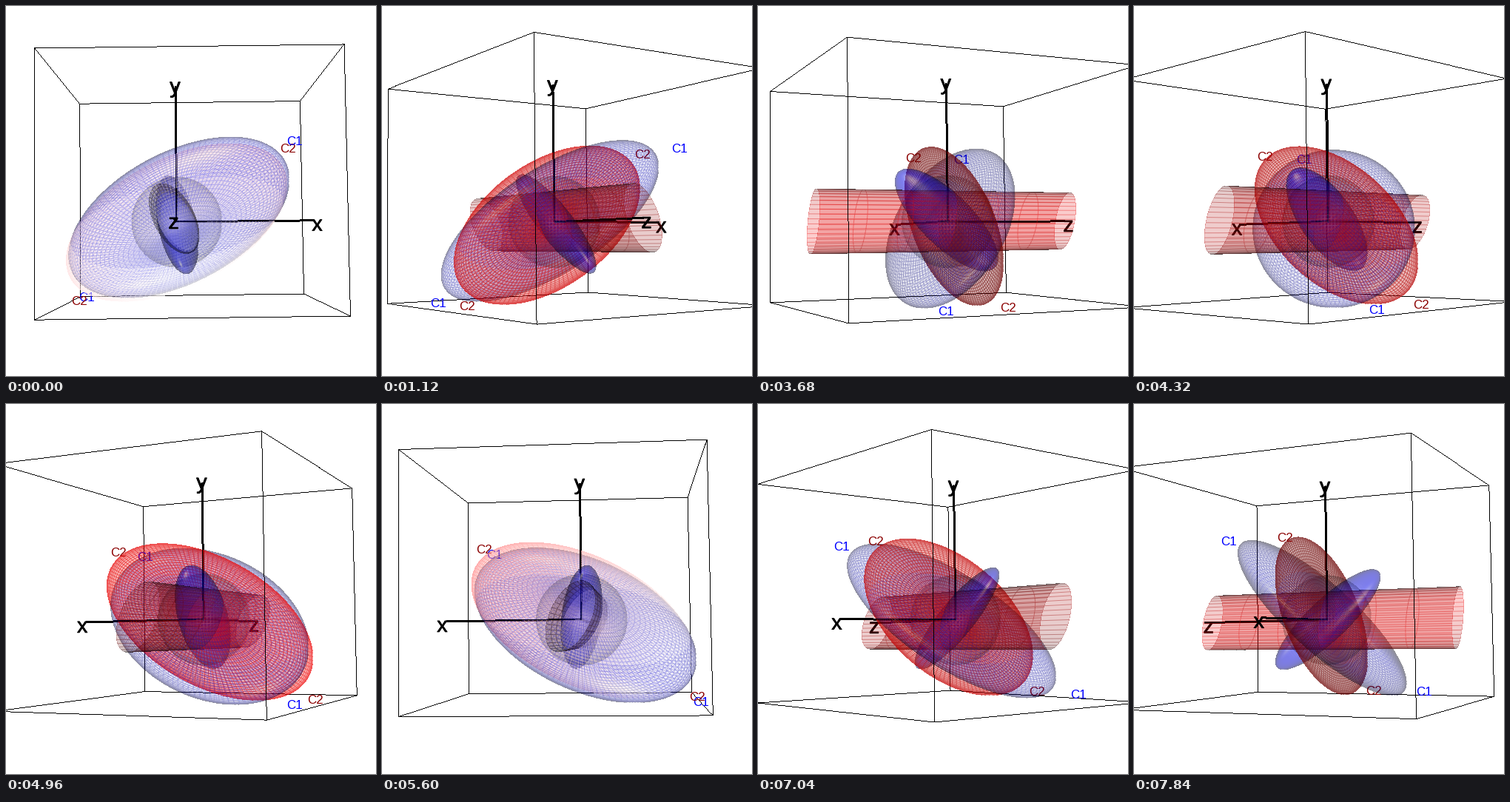
These frames come from a looping animation (500 by 500 pixels, 8000 ms). A matplotlib script:

```python
import itertools

import matplotlib.pyplot as plt
import numpy as np
from matplotlib.animation import FuncAnimation
from matplotlib.patheffects import withStroke

SIZE, DPI = 500, 100
PX = 72 / DPI                          # points per pixel
FRAMES, INTERVAL = 50, 160
STEP = np.radians(5)                   # turn per frame
PITCH, ROLL = 0.059, 0.012
SCALE, DIST = 61.3, 18.44              # pixels per unit, eye distance
CENTER = np.array([0.318, 0.68, 0.04])
HALF = np.array([2.861, 2.49, 3.15])   # half sides of the box
X0, X1, Y0, Y1 = 40, 470, 100, 420     # traced part of the stage
CYL = 3.0

RED, BLUE, GRAY = (1, 0, 0), (0, 0, 1), (0.35, 0.35, 0.35)


def axes_of(cov):
    """Half axes (long to short) and directions of a covariance ellipsoid."""
    val, vec = np.linalg.eigh(np.array(cov, float))
    return np.sqrt(val[::-1]), vec[:, ::-1]


full_s, full_u = axes_of([[6, 2, 1], [2, 3, 2], [1, 2, 2]])
flat_s, flat_u = axes_of([[6, 2], [2, 3]])

# Each matrix maps its surface to the unit sphere.
TO_C1 = np.diag(1 / full_s) @ full_u.T
TO_INV1 = np.diag(full_s) @ full_u.T
TO_BALL = np.roll(np.eye(3), 1, axis=0)
TO_CYL = np.zeros((3, 3))
TO_CYL[:2, :2] = np.diag(flat_s) @ flat_u.T
TO_DISK = np.diag(1 / flat_s) @ flat_u.T

# matrix, colour, fill alpha, wire alpha, meridians, parallels (0 = open tube)
SOLIDS = [
    (TO_C1, BLUE, 0.02, 0.23, 120, 60),
    (TO_INV1, BLUE, 0.03, 0.27, 120, 60),
    (TO_BALL, GRAY, 0.0, 0.15, 90, 45),
    (TO_CYL, RED, 0.20, 0.30, 40, 0),
]
DISK_FILL, DISK_WIRE = 0.26, 0.44

AXES = np.eye(3) * 3.0
LABELS = [("x", (3.1, 0, 0)), ("y", (0, 3.1, 0)), ("z", (0, 0, 3.1))]
TAGS = [("C1", (2.32, 1.66, 1.30), "#0000ff"),
        ("C2", (2.32, 1.65, 0.0), "#8b0000")]

cols, rows = np.meshgrid(np.arange(X0, X1) + 0.5, np.arange(Y0, Y1) + 0.5)
RAYS = np.stack([(cols - SIZE / 2) / SCALE, (SIZE / 2 - rows) / SCALE,
                 np.full(cols.shape, -DIST)])
VIEW = -RAYS / np.linalg.norm(RAYS, axis=0)
MID = VIEW + np.array([0, 0, 1.0])[:, None, None]
MID /= np.linalg.norm(MID, axis=0)


def rotation(theta):
    c, s = np.cos(theta), np.sin(theta)
    yaw = np.array([[c, 0, s], [0, 1, 0], [-s, 0, c]])
    c, s = np.cos(PITCH), np.sin(PITCH)
    pitch = np.array([[1, 0, 0], [0, c, s], [0, -s, c]])
    c, s = np.cos(ROLL), np.sin(ROLL)
    roll = np.array([[c, -s, 0], [s, c, 0], [0, 0, 1]])
    return roll @ pitch @ yaw


def project(rot, point):
    x, y, z = rot @ (np.asarray(point, float) - CENTER)
    k = SCALE / (1 - z / DIST)
    return SIZE / 2 + k * x, SIZE / 2 - k * y, z


def apply(mat, field):
    return np.tensordot(mat, field, axes=1)


def wires(phase, period=1e9):
    """Coverage of one-pixel lines at whole values of phase."""
    slope = 0
    for ax in (0, 1):
        last = np.take(phase, [-1], axis=ax)
        d = np.diff(phase, axis=ax, append=last)
        slope = slope + (d - period * np.round(d / period)) ** 2
    slope = np.sqrt(np.nan_to_num(slope, nan=1.0)) + 1e-6
    line = np.clip(1 - np.abs(phase - np.round(phase)) / slope, 0, 1)
    return np.where(slope > 0.6, np.minimum(slope, 1), line)


def lit(normal, color, view, mid):
    """Headlight shading with a white highlight, both sides lit."""
    normal = normal / np.linalg.norm(normal, axis=0)
    normal = normal * np.sign((normal * view).sum(0))
    diffuse = np.clip(normal[2], 0, 1)
    shine = np.clip((normal * mid).sum(0), 0, 1) ** 50
    rgb = [np.clip(c * diffuse + shine, 0, 1) for c in color]
    return np.stack(rgb)


def layer(box, t, rgb, alpha):
    depth = np.full(cols.shape, np.inf)
    rgba = np.zeros((4,) + cols.shape)
    ok = np.isfinite(t) & np.isfinite(alpha)
    depth[box] = np.where(ok, t, np.inf)
    rgba[(slice(3, 4),) + box] = np.where(ok, alpha, 0)
    rgba[(slice(0, 3),) + box] = np.where(ok, rgb, 0)
    return depth, rgba


def bounds(mask):
    r, c = np.where(mask.any(1))[0], np.where(mask.any(0))[0]
    return slice(r[0], r[-1] + 1), slice(c[0], c[-1] + 1)


def solid_layers(rot, eye, ray, solid):
    mat, color, fill, wire, n_mer, n_par = solid
    bo, bd = mat @ eye, apply(mat, ray)
    a = (bd ** 2).sum(0)
    b = apply(bo, bd)
    disc = b * b - a * (bo @ bo - 1)
    box = bounds(disc > 0)
    crop = (slice(None),) + box
    a, b, bd = a[box], b[box], bd[crop]
    root = np.sqrt(np.where(disc[box] > 0, disc[box], np.nan))
    for sign in (-1, 1):
        t = (-b + sign * root) / a
        q = bo[:, None, None] + t * bd
        rgb = lit(apply(rot @ mat.T, q), color, VIEW[crop], MID[crop])
        mer = wires(np.arctan2(q[1], q[0]) * n_mer / (2 * np.pi), n_mer)
        if n_par:
            par = wires(np.arccos(np.clip(q[2], -1, 1)) * n_par / np.pi)
        else:
            z = eye[2] + t * ray[2][box]
            t = np.where(np.abs(z) <= CYL, t, np.nan)
            par = wires(z)
        cover = 1 - (1 - mer) * (1 - par)
        yield layer(box, t, rgb, fill + wire * cover)


def disk_layer(rot, eye, ray):
    t = -eye[2] / ray[2]
    q = apply(TO_DISK, eye[:2, None, None] + t * ray[:2])
    rho = np.hypot(q[0], q[1])
    box = bounds(rho <= 1)
    crop = (slice(None),) + box
    t, q, rho = t[box], q[crop], rho[box]
    rho = np.where(rho <= 1, rho, np.nan)
    mer = wires(np.arctan2(q[1], q[0]) * 120 / (2 * np.pi), 120)
    par = wires(np.arcsin(rho) * 60 / np.pi)
    normal = np.broadcast_to(rot[:, 2][:, None, None], (3,) + t.shape)
    rgb = lit(normal, RED, VIEW[crop], MID[crop])
    cover = 1 - (1 - mer) * (1 - par)
    return layer(box, t, rgb, DISK_FILL + DISK_WIRE * cover + 0 * rho)


def axis_layer(rot, width=3):
    depth = np.full(cols.shape, np.inf)
    rgba = np.zeros((4,) + cols.shape)
    ax, ay, az = project(rot, (0, 0, 0))
    for tip in AXES:
        bx, by, bz = project(rot, tip)
        dx, dy = bx - ax, by - ay
        s = ((cols - ax) * dx + (rows - ay) * dy) / (dx * dx + dy * dy + 1e-9)
        s = np.clip(s, 0, 1)
        on = np.hypot(cols - ax - s * dx, rows - ay - s * dy) <= width / 2
        ta, tb = 1 - az / DIST, 1 - bz / DIST
        t = 1 / ((1 - s) / ta + s / tb)
        depth[on] = np.minimum(depth, t)[on]
        rgba[3][on] = 1
    return depth, rgba


def trace(rot):
    eye = rot.T @ np.array([0, 0, DIST]) + CENTER
    ray = apply(rot.T, RAYS)
    parts = [p for s in SOLIDS for p in solid_layers(rot, eye, ray, s)]
    parts += [disk_layer(rot, eye, ray), axis_layer(rot)]
    depth = np.stack([p[0] for p in parts])
    hit = np.isfinite(depth).any(0)
    order = np.argsort(-depth[:, hit], axis=0)
    rgba = np.stack([p[1][:, hit] for p in parts])
    pick = np.arange(order.shape[1])
    rgb, cover = np.zeros((3, pick.size)), np.zeros(pick.size)
    for idx in order:                  # far to near
        src = rgba[idx, :, pick].T
        rgb = rgb * (1 - src[3]) + src[:3] * src[3]
        cover = cover * (1 - src[3]) + src[3]
    out = np.zeros(cols.shape + (4,))
    out[hit, :3] = np.clip(rgb / np.maximum(cover, 1e-6), 0, 1).T
    out[hit, 3] = np.clip(cover, 0, 1)
    return out


corners = list(itertools.product((-1, 1), repeat=3))
EDGES = [(CENTER + HALF * a, CENTER + HALF * b)
         for a, b in itertools.combinations(corners, 2)
         if sum(i != j for i, j in zip(a, b)) == 1]


def box_images(rot):
    """One-pixel jagged edges of the box, far and near ones apart."""
    out = np.zeros((2, SIZE, SIZE, 4))
    for a, b in EDGES:
        xa, ya, za = project(rot, a)
        xb, yb, zb = project(rot, b)
        n = int(max(abs(xb - xa), abs(yb - ya))) + 2
        x = np.floor(np.linspace(xa, xb, n)).astype(int)
        y = np.floor(np.linspace(ya, yb, n)).astype(int)
        ok = (x >= 0) & (x < SIZE) & (y >= 0) & (y < SIZE)
        out[int(za + zb > 0), y[ok], x[ok], 3] = 1
    return out


fig = plt.figure(figsize=(SIZE / DPI, SIZE / DPI), dpi=DPI, facecolor="white")
ax = fig.add_axes([0, 0, 1, 1])
ax.axis("off")


def make_image(x0, x1, y0, y1, zorder):
    return ax.imshow(np.zeros((y1 - y0, x1 - x0, 4)), extent=(x0, x1, y1, y0),
                     interpolation="nearest", aspect="auto", zorder=zorder)


far_box = make_image(0, SIZE, 0, SIZE, 1)
scene = make_image(X0, X1, Y0, Y1, 2)
near_box = make_image(0, SIZE, 0, SIZE, 3)
ax.set_xlim(0, SIZE)
ax.set_ylim(SIZE, 0)


def make_text(word, size, color):
    return ax.text(0, 0, word, fontsize=size * PX, color=color, ha="center",
                   va="baseline", family="Liberation Sans", clip_on=True)


# artist, anchor, shift right, shift down
texts = []
for word, pos in LABELS:
    text = make_text(word, 28.5, "black")
    text.set_path_effects([withStroke(linewidth=0.7 * PX, foreground="black")])
    texts.append((text, pos, -0.5, 14))
for word, pos, color in TAGS:
    for sign in (1, -1):
        texts.append((make_text(word, 17, color), sign * np.array(pos), 9.5, 8.5))


def update(i):
    rot = rotation(i * STEP)
    scene.set_data(trace(rot))
    for image, data in zip((far_box, near_box), box_images(rot)):
        image.set_data(data)
    for text, pos, right, down in texts:
        x, y, z = project(rot, pos)
        text.set_position((x + right, y + down))
        text.set_zorder(4 if z > 0 else 1.5)
    return [scene]


anim = FuncAnimation(fig, update, frames=FRAMES, interval=INTERVAL,
                     repeat=True, repeat_delay=0, blit=False)
plt.show()
```
